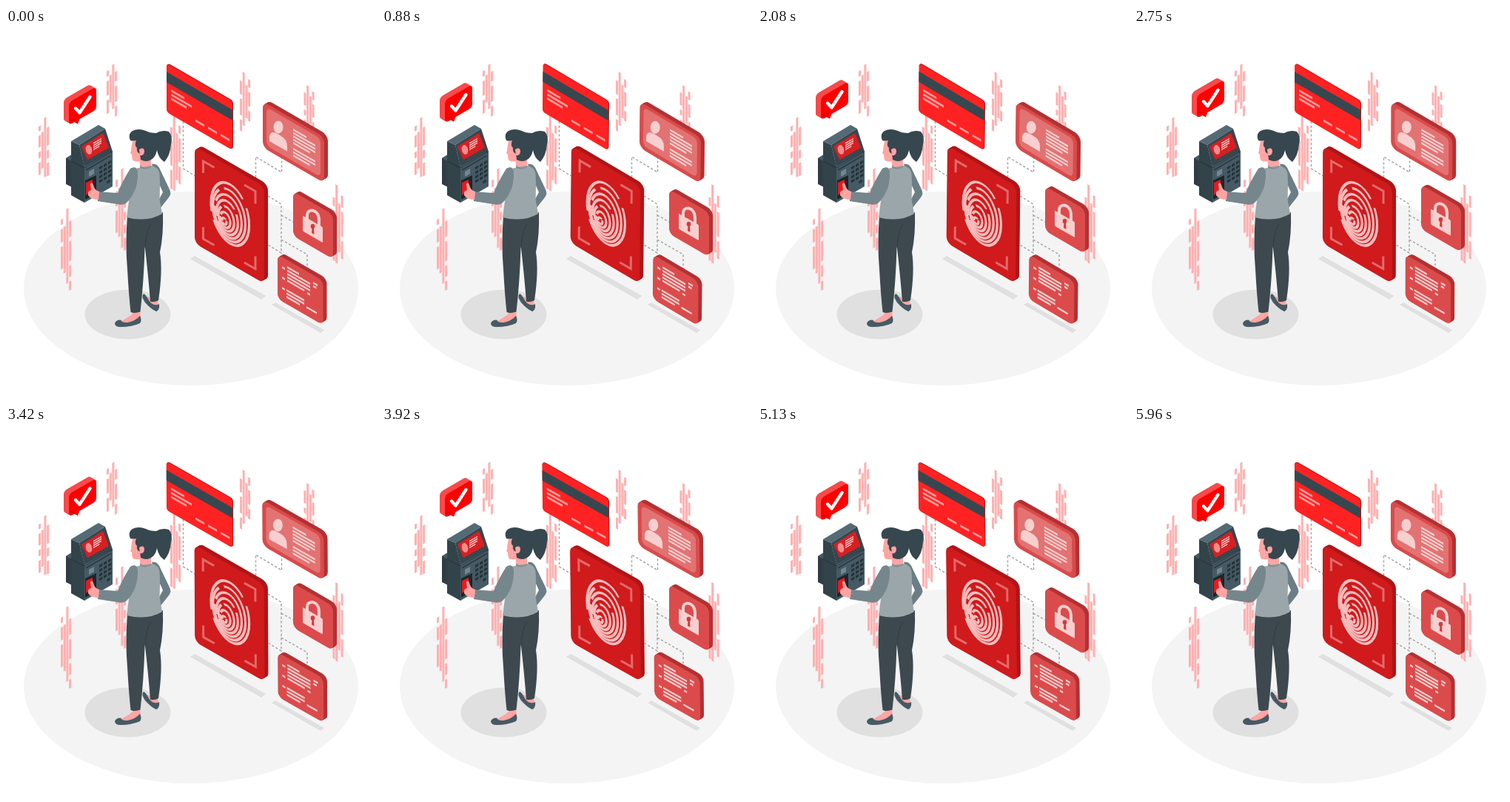
Write an HTML page that moves like this. It is 500 px wide and 500 px high and loops after 6 s.

```html
<!DOCTYPE html>
<html lang="en">
<head>
<meta charset="utf-8">
<title>Fingerprint access</title>
<style>
html, body { margin: 0; width: 100%; height: 100%; overflow: hidden; background: #fff; }
svg { display: block; width: 100vw; height: 100vh; }
</style>
</head>
<body>
<svg id="stage" viewBox="0 0 500 500"></svg>
<script>
const S = Math.tan(Math.PI / 6);
const PINK = '#f8cfcf';
const stage = document.getElementById('stage');

const path = (d, fill, more = '') => `<path d="${d}" fill="${fill}" ${more}/>`;
const line = (d, color, width, more = '') =>
  path(d, 'none', `stroke="${color}" stroke-width="${width}" ${more}`);
const ellipse = (x, y, rx, ry, fill, more = '') =>
  `<ellipse cx="${x}" cy="${y}" rx="${rx}" ry="${ry}" fill="${fill}" ${more}/>`;
const group = (id, body) => `<g id="${id}">${body}</g>`;
const repeat = (n, draw) => Array.from({ length: n }, (_, i) => draw(i)).join('');

// Isometric parallelogram; the slope picks the wall.
const slab = (x, y, w, h, s = S) =>
  `M${x} ${y}l${w} ${w * s}v${h}l${-w} ${-w * s}z`;

// Lines of writing; the last one is shorter.
const text = (x, y, count, width, gap = 4.5, color = PINK, s = S) =>
  path(repeat(count, i => slab(x, y + i * gap, width * (i && i === count - 1 ? .75 : 1), gap * .56, s)), color);

const plate = (x, y, w, h, r, fill, angle = 30) =>
  `<rect width="${w}" height="${h}" rx="${r}" fill="${fill}" transform="translate(${x} ${y}) skewY(${angle})"/>`;

function block(x, y, w, h, r, front, side, depth, angle = 30) {
  const dir = Math.sign(angle);
  const sides = repeat(depth * 2, i => {
    const d = depth - i / 2;
    return plate(x + d * dir, y - d * S, w, h, r, side, angle);
  });
  return sides + plate(x, y, w, h, r, front, angle);
}

function random(seed) {
  return () => (seed = seed * 16807 % 2147483647) / 2147483647;
}

// One full column, one half column and two broken ones; the right wall mirrors the left.
function bars(x, y, h, dir) {
  const rand = random(x * 97 + y);
  const column = (i, top, height) =>
    slab(x + 3.7 * (dir < 0 ? i : 3 - i), top, 3, height, dir * S);
  const broken = (i, top, end) => {
    let d = '';
    while (top < end) {
      const size = 6 + rand() * h * .28;
      d += column(i, top, size);
      top += size + 6;
    }
    return d;
  };
  return path(broken(0, y + h * .14, y + h * .85) + column(1, y + h * .24, h * .62) +
    column(2, y, h) + broken(3, y + h * .16, y + h), '#ffb0b0');
}

function ground() {
  return ellipse(250, 352, 226, 131, '#f4f4f4') + ellipse(164.5, 387, 58, 33.5, '#e0e0e0') +
    path('M249 312l6-4 96 54-6 5zM359 374l5-3 66 37-5 4z', '#e0e0e0');
}

function walls() {
  return bars(44, 122, 80, -1) + bars(136, 50, 60, -1) + bars(74, 245, 101, -1) + bars(148, 191, 107, -1) +
    bars(316, 59, 72, 1) + bars(222, 117, 102, 1) + bars(402.5, 77, 60, 1) + bars(441.5, 211, 106, 1);
}

const wires = () => line('M239.5 126v64l16 10M337.500 202v-28l35 21v-20M354 227l18 11v66l-18-11M372 253l16 9M372 286l35 20v20',
  '#a0a0a0', 1.4, 'stroke-dasharray="3.200 2.600"');

function card() {
  return block(217, 47.6, 89, 66, 4, '#ff2222', '#b51919', 1) +
    path(slab(217, 59.3, 89, 14), '#37474f') +
    text(223, 83, 1, 18, 5.5, '#ff9c9c') + text(223, 88.5, 2, 28, 5.5, '#ff9c9c') +
    path(repeat(3, i => slab(256 + 17 * i, 123.5 + 9.8 * i, 12, 3)), '#ff9c9c');
}

function finger() {
  const ridges = repeat(7, k => ellipse(0, 0, 3 + 3.8 * k, 4 + 6 * k, 'none',
    `pathLength="100" stroke-dasharray="${40 + 13 * (k % 3)} 5" transform="translate(${295 + 1.3 * k} ${261 - 1.6 * k}) skewY(30)"`));
  return block(255, 160, 94, 131, 8, '#d01a1c', '#ad1719', 5) +
    line('M266.500 196v-16l15 8.500M322 212l15 8.500v17M266.500 269v16l15 8.500M322 317l15 8.500v-17', '#e36a6b', 3) +
    `<g stroke="#f6bcbc" stroke-width="3.100">${ridges}</g>`;
}

function badge() {
  return block(347, 99.5, 83, 62, 8, '#db4a4a', '#b23234', 5) +
    plate(352, 107, 73, 52, 6, '#e37272') +
    ellipse(368, 134, 6.500, 8.5, PINK) +
    path('M356 153v-6q1-9 10-4.500l5 3q9 5 9 14v7z', PINK) +
    text(388, 136, 1, 18) + text(388, 140.500, 4, 30) + text(388, 162, 3, 30);
}

function sheet() {
  return block(367, 306, 61.5, 60, 7, '#dc4b4b', '#b23234', 5) +
    text(373, 322, 3, 4, 14 / 3 * 2.9, 'none') +
    path(repeat(3, i => slab(373, 322 + 14 * i, 4, 2.5)), PINK) +
    text(380, 322, 1, 16) + text(380, 326.500, 4, 31) + text(379, 353, 3, 24) +
    text(415, 343, 2, 6) + text(407, 357, 1, 4) + text(406, 376, 1, 14);
}

function lock() {
  return block(388, 221, 54, 60, 7, '#dc4b4b', '#b23234', 5) +
    line('M407 260v-7c0-10 16-9 16 7v8', PINK, 4) +
    plate(401, 253.5, 27, 21, 1.5, PINK) +
    ellipse(414.5, 268, 2.8, 3.2, '#d23b3b') + path('M413.500 270h2.500l.500 9-3.500-2z', '#d23b3b');
}

function bubble() {
  return block(85, 100.5, 37, 31, 5, '#ff0000', '#f94a4a', 7, -30) +
    path('M86 124l11 5.500 2-7z', '#d80000') + path('M90 125l7 4.500 3-8z', '#ff0000') +
    line('M94 108.500l5.500 6 14-21.500', '#fff', 4.4, 'stroke-linecap="round" stroke-linejoin="round"');
}

function terminal() {
  const keys = repeat(3, c => repeat(4, r => slab(126 + 6 * c, 188 - 3.5 * c + 6 * r, 4.2, 3.4, -S)));
  return path('M81 176l8-5 14 7v38l-6 3-16-8z', '#2f3e45') + path('M81 176l8-5 14 7-8 5z', '#455a64') +
    path('M88 153l11 5 7 29v49l-18-10v-46z', '#33434a') +
    path('M88 153l37-22 9 5-35 22z', '#546a74') +
    path('M99 158l35-22 10 31-38 21z', '#37474f') +
    path('M106 188l38-21v47l-38 22z', '#455a64') +
    line('M88 180l18 9 38-22', '#263238', 1) +
    path('M102 160l29-18 8 20-29 16z', '#d81f22') +
    ellipse(112, 164.5, 4.2, 6.5, '#f28d8d', 'transform="rotate(-12 112 164.500)"') +
    text(118, 155, 4, 11, 2.9, '#ffd0d0', -S) +
    path(slab(108, 191, 34, 2, -S), '#2c3a41') +
    path(slab(112, 194, 7, 7, -S), '#74868e') +
    path(keys + slab(136.5, 207, 4.2, 3.4, -S), '#24323a') +
    path('M107 206l15-7v24l-15 9z', '#1c262b') + path('M108 209l9-4 1 14-10 7z', '#e51c1f');
}

function woman() {
  const skin = '#ffa5a3', hair = '#37474f', pants = '#3d494e', shoe = '#455a64';
  return path('M171 383l10-1 1 9q-13 10-29 6 10-4 18-11zM191 363l14 5 1 8q-9 2-16-9z', skin) +
    path('M147 399q2-5 8-4.500 2 4 9 3.500 11-2 17-9 3 6 0 10-11 5-26 5-8 0-8-5zM186 359q-4 3 2 12 8 9 15 12 5-2 4-10-8 4-14-5-4-8-7-9z', shoe) +
    // Legs
    path('M186 255Q200 255 212 249Q213 280 208 303Q212 328 206 368Q201 371 195 369.500Q192 332 188 298z', pants) +
    path('M164 253Q176 259 193 256Q190 278 187.500 298Q186 345 181.500 383.500Q174 386 168.500 384Q166 362 164 326Q161 292 164 253z', pants) +
    line('M196 265q-7 9-8 32', '#303b40', 1) +
    // Arm on the hip, neck and torso
    path('M197 184q8-2 12 9l12 25q3 6-1 11l-12 15-3-9 7-13-8-18z', '#6c7d85') +
    path('M181 172h15v15q-7 6-15 1z', skin) +
    path('M175 190q11-3 22-4 9 2 10.500 11 1 14 0 34l3.500 20q-20 12-48 5l3-22q0-32 9-44z', '#9ba6aa') +
    path('M181 186q8 5 15 0v2q-8 5-15 1z', '#829096') +
    // Reaching arm and hand
    path('M168 190q8-5 10 4 1 27-16 43-4 3-12 1l-26-4-1-13 28 2q5-14 17-33z', '#76868d') +
    path('M126 221q-7-2-8-9-2-5-4-1l1 8q-5 1-4 7 4 6 14 6z', skin) +
    // Face, hair and ear
    path('M171 153q-2 9-2 13l-1 3 2 2q0 9 4 9 7 1 11-1l8-14-6-16z', skin) +
    path('M168 152q-4-9 3-13 8-4 18 0 5 3 14 3 8-5 17-2 6 6 3 17-1 15-9 24-8-5-10-16-2 10-8 13-6 4-14 0l-1-8q-5-2-4-8-4-3-1-10-4 1-8 0z', hair) +
    path('M180 164q6-4 7 2 0 7-6 6z', skin);
}

stage.innerHTML = ground() + walls() + wires() + group('card', card()) +
  group('panels', finger() + badge() + sheet()) + group('lock', lock()) +
  group('bubble', bubble()) + terminal() + woman();

const move = (id, value) => document.getElementById(id).setAttribute('transform', value);

function frame(now) {
  const p = now % 6000 / 6000;
  const lift = -10 * (1 - Math.abs(1 - 2 * p));
  // Triangle wave: 1 degree at a quarter, -1 at three quarters.
  const tilt = 1 - 4 * Math.abs((p + .25) % 1 - .5);
  move('bubble', `translate(0 ${lift})`);
  move('lock', `translate(0 ${lift})`);
  move('card', `rotate(${tilt} 262 106)`);
  move('panels', `rotate(${tilt} 345 249)`);
  requestAnimationFrame(frame);
}
requestAnimationFrame(frame);
</script>
</body>
</html>
```
